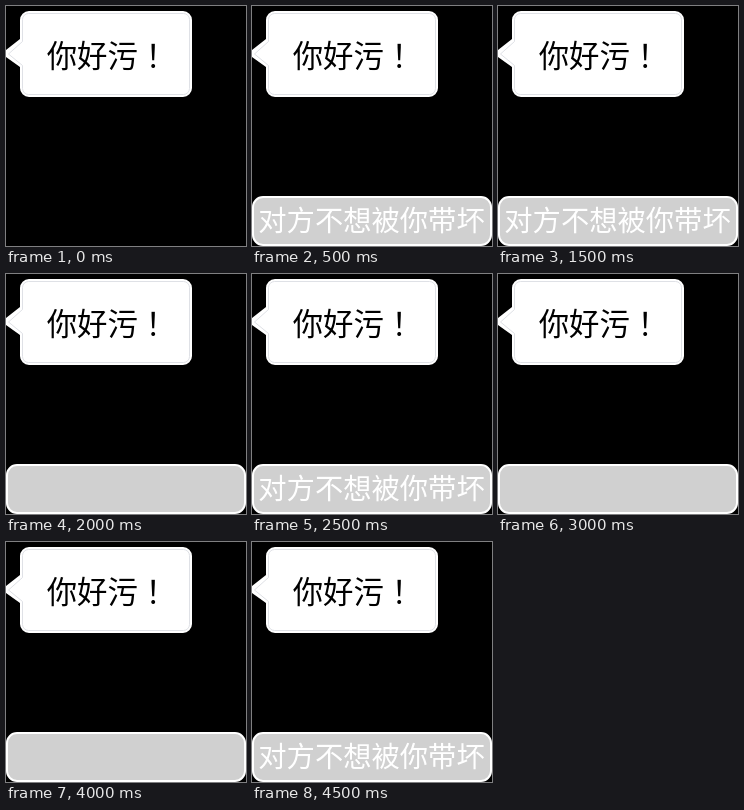
Animation of 240 by 240 pixels, one loop 8000 ms. Source, as an HTML page:

```html
<!DOCTYPE html>
<html lang="zh-CN">
<meta charset="utf-8">
<style>
  html, body { margin: 0; width: 100%; height: 100%; overflow: hidden; background: #000; }
  svg { display: block; width: 100%; height: 100%; }
  text { font-family: "Noto Sans CJK SC", "Noto Sans CJK", sans-serif; }
  .mark { font-family: "Noto Sans CJK TC", "Noto Sans CJK SC", sans-serif; }
</style>
<svg viewBox="0 0 240 240">
  <path fill="#fff" d="M23 5H177A9 9 0 0 1 186 14V82A9 9 0 0 1 177 91H23A9 9 0 0 1 14 82V61L0 51V44L14 33V14A9 9 0 0 1 23 5Z"/>
  <path fill="none" stroke="#dfe1e6" d="M22.5 7.5H177.5A6 6 0 0 1 183.5 13.5V82.5A6 6 0 0 1 177.5 88.5H22.5A6 6 0 0 1 16.5 82.5V59.5L2.5 48L16.5 35.5V13.5A6 6 0 0 1 22.5 7.5Z"/>
  <text x="40.7" y="61" font-size="30.4">你好污<tspan class="mark" lang="zh-TW">！</tspan></text>
  <g id="bar">
    <rect x="1" y="191" width="238" height="48" rx="10" fill="#d0d0d0" stroke="#fff" stroke-width="2"/>
    <text id="note" x="119.5" y="225" font-size="28.3" text-anchor="middle" fill="#fff">对方不想被你带坏</text>
  </g>
</svg>
<script>
  const LOOP = 8000, BLINK = 500, STEADY = 4500;
  const bar = document.getElementById('bar');
  const note = document.getElementById('note');
  const show = (el, on) => el.setAttribute('visibility', on ? 'visible' : 'hidden');

  function draw() {
    const t = performance.now() % LOOP;
    const started = t >= BLINK;
    show(bar, started);
    show(note, started && (t >= STEADY || Math.floor(t / BLINK) % 2 === 1));
    requestAnimationFrame(draw);
  }
  draw();
</script>
</html>
```
